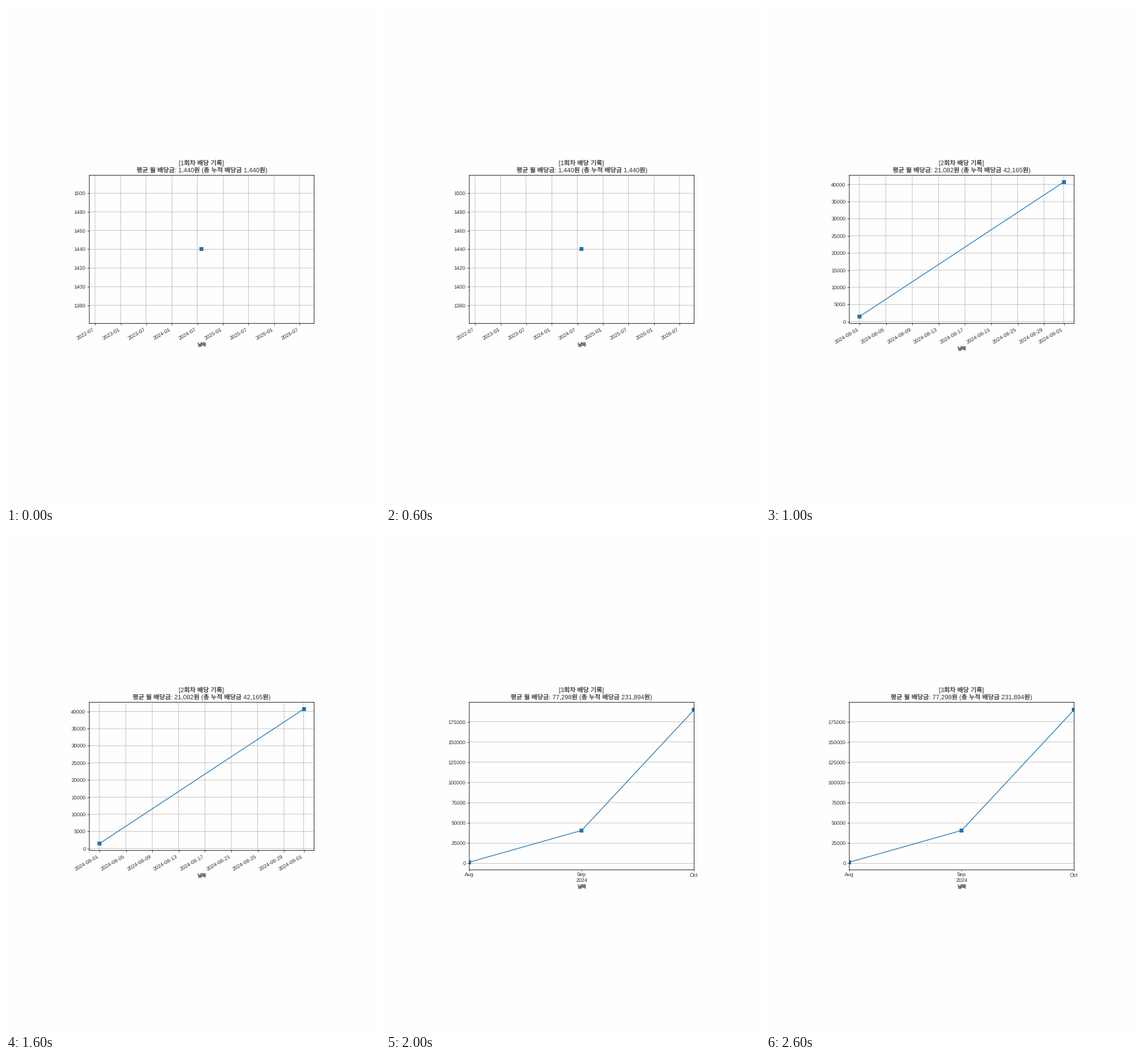
Animation, 576 px wide and 768 px high, one loop 3000 ms. Source, as a matplotlib script:

```python
import matplotlib.pyplot as plt
import numpy as np
from matplotlib.animation import FuncAnimation

W, H, DPI = 576, 768, 96
PX = 72 / DPI            # points per pixel
PAPER, INK, BLUE = "#fefefe", "#303030", "#1f77b4"
LEFT, RIGHT, TOP = 128.2, 474.4, 260.5
TICK_SIZE, TITLE_SIZE = 8.1 * PX, 9.7 * PX
THIN = 0.65 * PX

plt.rcParams["font.family"] = ["Liberation Sans", "Noto Sans CJK JP"]
plt.rcParams["text.hinting"] = "none"
plt.rcParams["path.snap"] = False

payouts = np.array([1440, 40725, 189729])
months = np.array(["2024-08-01", "2024-09-01", "2024-10-01"], "datetime64[D]")

fig = plt.figure(figsize=(W / DPI, H / DPI), dpi=DPI, facecolor=PAPER)
ax = fig.add_axes([0, 0, 1, 1])


def days(dates):
    """Days counted from the first payout."""
    return (np.array(dates, "datetime64[D]") - months[0]).astype(float)


def padded(low, high):
    pad = 0.05 * (high - low)
    return low - pad, high + pad


def text_at(x, y, s, size):
    ax.text(x / W, 1 - y / H, s, size=size, color=INK, ha="center",
            va="baseline", transform=fig.transFigure)


def half_years():
    starts = np.arange("2022-07", "2026-08", 6, dtype="datetime64[M]")
    return days(starts), [str(s) for s in starts]


def four_days():
    dates = np.append(np.arange("2024-08-01", "2024-08-30", 4, dtype="datetime64[D]"),
                      months[1])
    return days(dates), [str(d) for d in dates]


def set_up(bottom, label_y, count):
    ax.cla()
    ax.set_position([LEFT / W, 1 - bottom / H, (RIGHT - LEFT) / W, (bottom - TOP) / H])
    ax.set_facecolor(PAPER)
    for spine in ax.spines.values():
        spine.set(linewidth=0.75 * PX, color="black")
    ax.tick_params(length=2.7 * PX, pad=2.7 * PX, width=THIN,
                   labelsize=TICK_SIZE, color="black", labelcolor=INK)

    total = payouts[:count].sum()
    middle = (LEFT + RIGHT) / 2
    text_at(middle, 244.6, f"[{count}회차 배당 기록]", TITLE_SIZE)
    text_at(middle, 255.9, f"평균 월 배당금: {total // count:,}원 "
            f"(총 누적 배당금 {total:,}원)", TITLE_SIZE)
    text_at(middle, label_y + 2.8, "날짜", 7.7 * PX)


def draw(i):
    count = i + 1
    y = payouts[:count]
    by_month = count == 3
    set_up(518.4 if by_month else 488.4, (521.2, 527.2, 544.2)[i], count)

    if by_month:
        x = np.arange(3)
        ax.set_xlim(0, 2)
        ax.set_xticks(x, ["Aug", "Sep\n2024", "Oct"])
        ax.tick_params(axis="x", length=1.6 * PX)
    else:
        x = days(months[:count])
        spots, names = four_days() if count == 2 else half_years()
        ax.set_xticks(spots, names, rotation=30, ha="right")
        ax.set_xlim(padded(0, x[-1]) if count == 2 else padded(-730, 730))

    low, high = (y.min(), y.max()) if count > 1 else (y[0] * 0.95, y[0] * 1.05)
    low, high = padded(low, high)
    step = (20, 5000, 25000)[i]
    ax.set_yticks(np.arange(np.ceil(low / step) * step, high, step))
    ax.set_ylim(low, high)

    ax.grid(axis="y" if by_month else "both", color="#b0b0b0", linewidth=THIN)
    ax.set_axisbelow(True)
    ax.plot(x, y, color=BLUE, linewidth=1.16 * PX, marker="s",
            markersize=5.3 * PX, markeredgewidth=0)
    return []


anim = FuncAnimation(fig, draw, frames=3, interval=1000, repeat=True)
plt.show()
```
